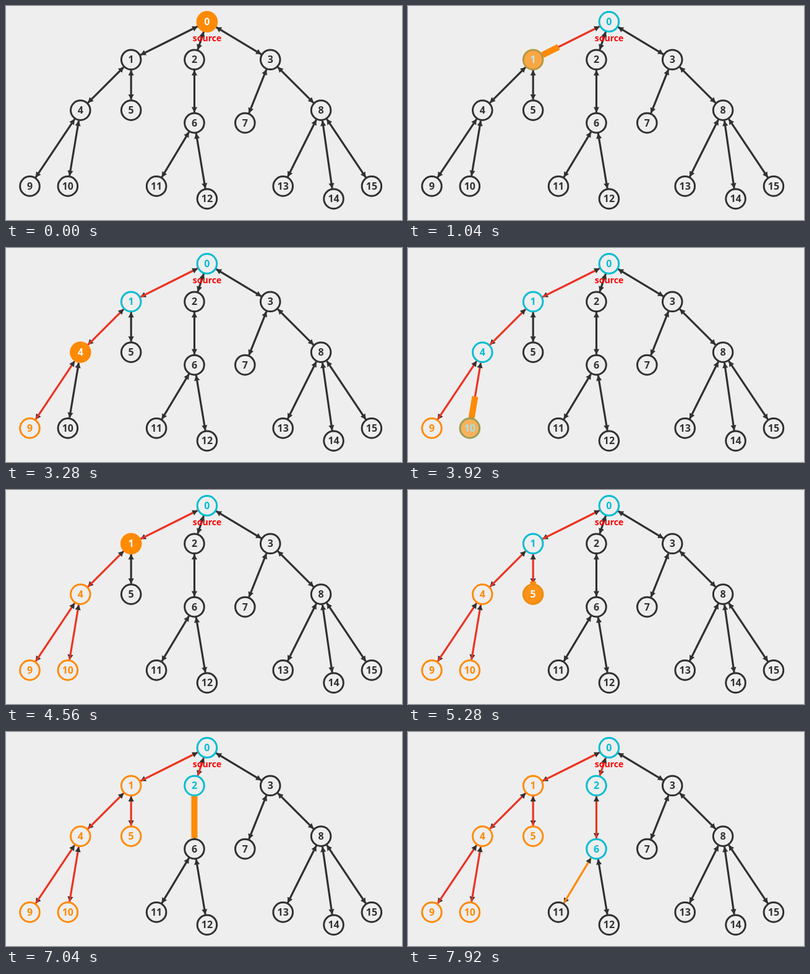
Recreate the animation shown at these times as an HTML page. Size 640 px wide and 346 px high, loop 8000 ms.

```html
<!DOCTYPE html>
<html lang="en">
<head>
<meta charset="utf-8">
<title>Depth-first search</title>
<style>
  html, body { margin: 0; width: 100%; height: 100%; overflow: hidden; background: #eee; }
  svg { display: block; width: 100vw; height: 100vh; }
  text { font: bold 16px "Open Sans", "Noto Sans", sans-serif; text-anchor: middle; }
  .source { font-size: 14px; fill: #f00; }
</style>
</head>
<body>
<svg id="stage" viewBox="0 0 640 346"></svg>
<script>
const LOOP = 8000, TICK = 80, MOVE = 170, RADIUS = 16;
const BG = [238, 238, 238], DARK = [49, 49, 49], ORANGE = [255, 138, 4],
      CYAN = [0, 189, 210], RED = [235, 52, 36], WHITE = [255, 255, 255];

// Node looks: fill, stroke, label
const LOOK = {
  idle: [BG, DARK, DARK],
  active: [ORANGE, ORANGE, WHITE],
  open: [BG, CYAN, CYAN],
  done: [BG, ORANGE, ORANGE]
};

// Grid column, grid row, parent
const TREE = [
  [14, 0], [8, 3, 0], [13, 3, 0], [19, 3, 0], [4, 7, 1], [8, 7, 1], [13, 8, 2], [17, 8, 3],
  [23, 7, 3], [0, 13, 4], [3, 13, 4], [10, 13, 6], [14, 14, 6], [20, 13, 8], [24, 14, 8], [27, 13, 8]
];
const nodes = TREE.map(([col, row, parent]) => ({ x: 38.5 + col * 20.46, y: 25.4 + row * 20.46, parent }));

// Step number and its start time; steps between are evenly spaced
const PACE = [[1, 460], [3, 970], [11, 3285], [21, 6070], [27, 7720]];

function startOf(step) {
  const i = PACE.findIndex(([n]) => n >= step);
  if (i <= 0) return PACE[0][1];
  const [n0, t0] = PACE[i - 1], [n1, t1] = PACE[i];
  return t0 + (t1 - t0) * (step - n0) / (n1 - n0);
}

// Every edge is named after its child node
function recordSearch() {
  const looks = nodes.map(() => 'idle'), edges = nodes.map(() => DARK), steps = [];
  const save = probe => steps.push({ looks: [...looks], edges: [...edges], probe });
  const settle = () => edges.forEach((c, i) => { if (c === ORANGE) edges[i] = RED; });

  function visit(u) {
    settle();
    looks[u] = 'active';
    save();
    nodes.forEach((node, v) => {
      const up = nodes[u].parent === v;
      if (!up && node.parent !== u) return;
      settle();
      looks[u] = 'open';
      const edge = up ? u : v;
      edges[edge] = ORANGE;
      save({ edge, up });
      if (up) return;
      visit(v);
      settle();
      looks[v] = 'done';
      looks[u] = 'active';
      save();
    });
  }
  visit(0);
  return steps.slice(0, PACE.at(-1)[0] + 1).map((s, i) => ({ ...s, start: i ? startOf(i) : 0 }));
}

const mix = (a, b, p) => a.map((v, i) => v + (b[i] - v) * p);
const rgb = c => `rgb(${c.map(Math.round)})`;
const ease = p => p < 0.5 ? 4 * p ** 3 : 1 - 4 * (1 - p) ** 3;

const stage = document.getElementById('stage');
function set(el, attrs) {
  for (const key in attrs) el.setAttribute(key, attrs[key]);
  return el;
}
function add(tag, attrs, text = '') {
  const el = document.createElementNS('http://www.w3.org/2000/svg', tag);
  el.textContent = text;
  return stage.appendChild(set(el, attrs));
}

function arrow(x, y, angle) {
  add('path', {
    d: 'M0 0L-8.5 4.6V-4.6Z', fill: rgb(DARK),
    transform: `translate(${x} ${y}) rotate(${angle * 180 / Math.PI})`
  });
}

nodes.forEach(node => {
  if (node.parent === undefined) return;
  const top = nodes[node.parent];
  const angle = Math.atan2(node.y - top.y, node.x - top.x);
  const dx = Math.cos(angle) * (RADIUS + 1), dy = Math.sin(angle) * (RADIUS + 1);
  node.ends = [[top.x + dx, top.y + dy], [node.x - dx, node.y - dy]];
  const [[x1, y1], [x2, y2]] = node.ends;
  arrow(x2, y2, angle);
  node.line = add('line', { x1, y1, x2, y2, 'stroke-width': 3.2 });
  arrow(x1, y1, angle + Math.PI);
});
const beam = add('line', { stroke: rgb(ORANGE), 'stroke-width': 10 });
nodes.forEach((node, i) => {
  node.disc = add('circle', { cx: node.x, cy: node.y, r: RADIUS - 0.2, 'stroke-width': 3 });
  node.label = add('text', { x: node.x, y: node.y + 5.6 }, i);
});
add('text', { class: 'source', x: 325, y: 57 }, 'source');

const steps = recordSearch();

function draw(time) {
  const i = steps.findLastIndex(s => s.start <= time);
  const now = steps[i], before = steps[Math.max(0, i - 1)];
  const raw = Math.min(1, (time - now.start) / MOVE), p = ease(raw);
  const probing = now.probe && raw > 0.08 && raw < 1;

  nodes.forEach((node, n) => {
    const [fill, stroke, ink] = LOOK[now.looks[n]].map((c, k) => rgb(mix(LOOK[before.looks[n]][k], c, p)));
    set(node.disc, { fill, stroke });
    set(node.label, { fill: ink });
    if (!node.line) return;
    let color = mix(before.edges[n], now.edges[n], p);
    if (now.probe && now.probe.edge === n) color = probing ? before.edges[n] : ORANGE;
    set(node.line, { stroke: rgb(color) });
  });

  set(beam, { visibility: probing ? 'visible' : 'hidden' });
  if (probing) {
    const { edge, up } = now.probe;
    const [from, to] = up ? [...nodes[edge].ends].reverse() : nodes[edge].ends;
    const tip = mix(from, to, p);
    set(beam, { x1: from[0], y1: from[1], x2: tip[0], y2: tip[1] });
  }
}

const begin = performance.now();
function frame() {
  const time = (performance.now() - begin) % LOOP;
  draw(Math.floor(time / TICK) * TICK);
  requestAnimationFrame(frame);
}
frame();
</script>
</body>
</html>
```
